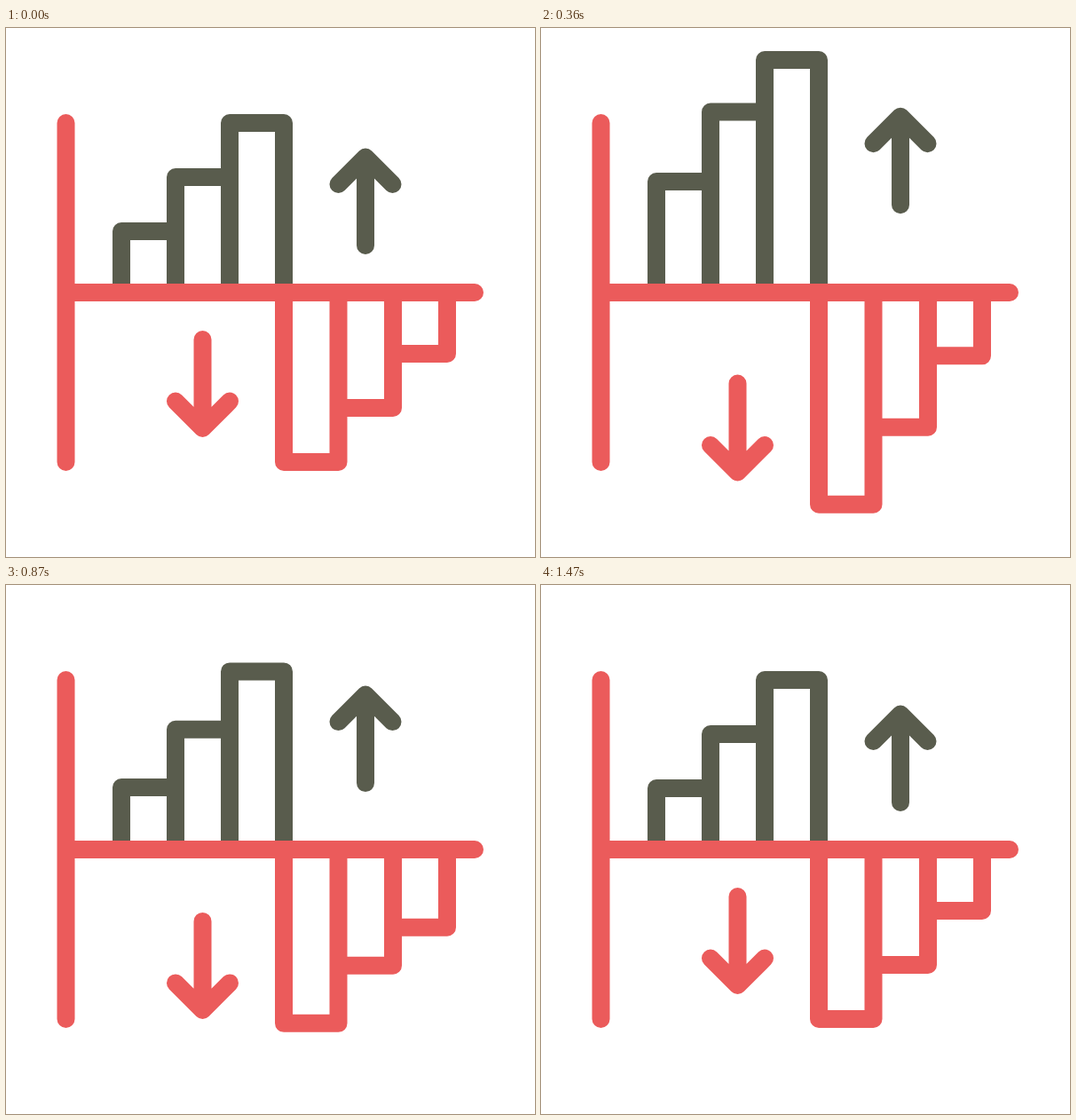
An HTML page for the animation above (1.5 s loop, 596 px wide and 596 px high).

```html
<!DOCTYPE html>
<html lang="en">
<head>
<meta charset="utf-8">
<title>Rising and falling bars</title>
<style>
  html, body { margin: 0; width: 100%; height: 100%; overflow: hidden; background: #fff; }
  svg { display: block; width: 100%; height: 100%; fill: none; stroke-width: 20; stroke-linejoin: round; }
  .gain { stroke: #595c4d; }
  .loss { stroke: #eb5b5b; }
  .cap { stroke-linecap: round; }
</style>
</head>
<body>
<svg viewBox="0 0 596 596">
  <path id="gains" class="gain"/>
  <path id="losses" class="loss"/>
  <path class="loss cap" d="M67.5 107V489M67.5 298H528"/>
  <path id="up" class="gain cap" d="M405 245V146M374.5 176L405 145.5L435.5 176"/>
  <path id="down" class="loss cap" d="M221.5 351V451M191 420.5L221.5 451L252 420.5"/>
</svg>
<script>
const LOOP = 1500, STEP = 30;
const [gains, losses, up, down] = ['gains', 'losses', 'up', 'down'].map(id => document.getElementById(id));

// Smooth hump: zero at peak - rise, full height at peak, zero again at peak + fall.
function hump(t, height, peak, rise, fall = rise) {
  const x = (t - peak) / (t < peak ? rise : fall);
  return Math.abs(x) < 1 ? height * Math.cos(x * Math.PI / 2) ** 2 : 0;
}

const gain = t => hump(t, 75, 314, 310) + hump(t, 11, 930, 260);
const loss = t => hump(t, 62, 475, 360, 310);

function draw(t) {
  const g1 = 229 - gain(t - 150), g2 = 168 - gain(t - 75), g3 = 107 - gain(t);
  gains.setAttribute('d', `M130 298V${g1}H191M191 298V${g2}H252M252 298V${g3}H313V298`);

  const l1 = 489 + loss(t) + hump(t, 18, 1040, 260);
  const l2 = 428 + loss(t - 100) + hump(t, 17, 1105, 260);
  const l3 = 367 + loss(t - 200) + hump(t, 7.5, 1200, 260);
  losses.setAttribute('d', `M313 298V${l1}H374.5V298M374.5 ${l2}H436V298M436 ${l3}H497V298`);

  const rise = hump(t, 49, 300, 300, 365) + hump(t, 22, 880, 240);
  const drop = hump(t, 60, 265, 265, 345) + hump(t, 28, 880, 240);
  up.setAttribute('transform', `translate(0 ${-rise})`);
  down.setAttribute('transform', `translate(0 ${drop})`);
}

const start = performance.now();
function tick() {
  const t = (performance.now() - start) % LOOP;
  draw(Math.floor(t / STEP) * STEP);
  requestAnimationFrame(tick);
}
tick();
</script>
</body>
</html>
```
